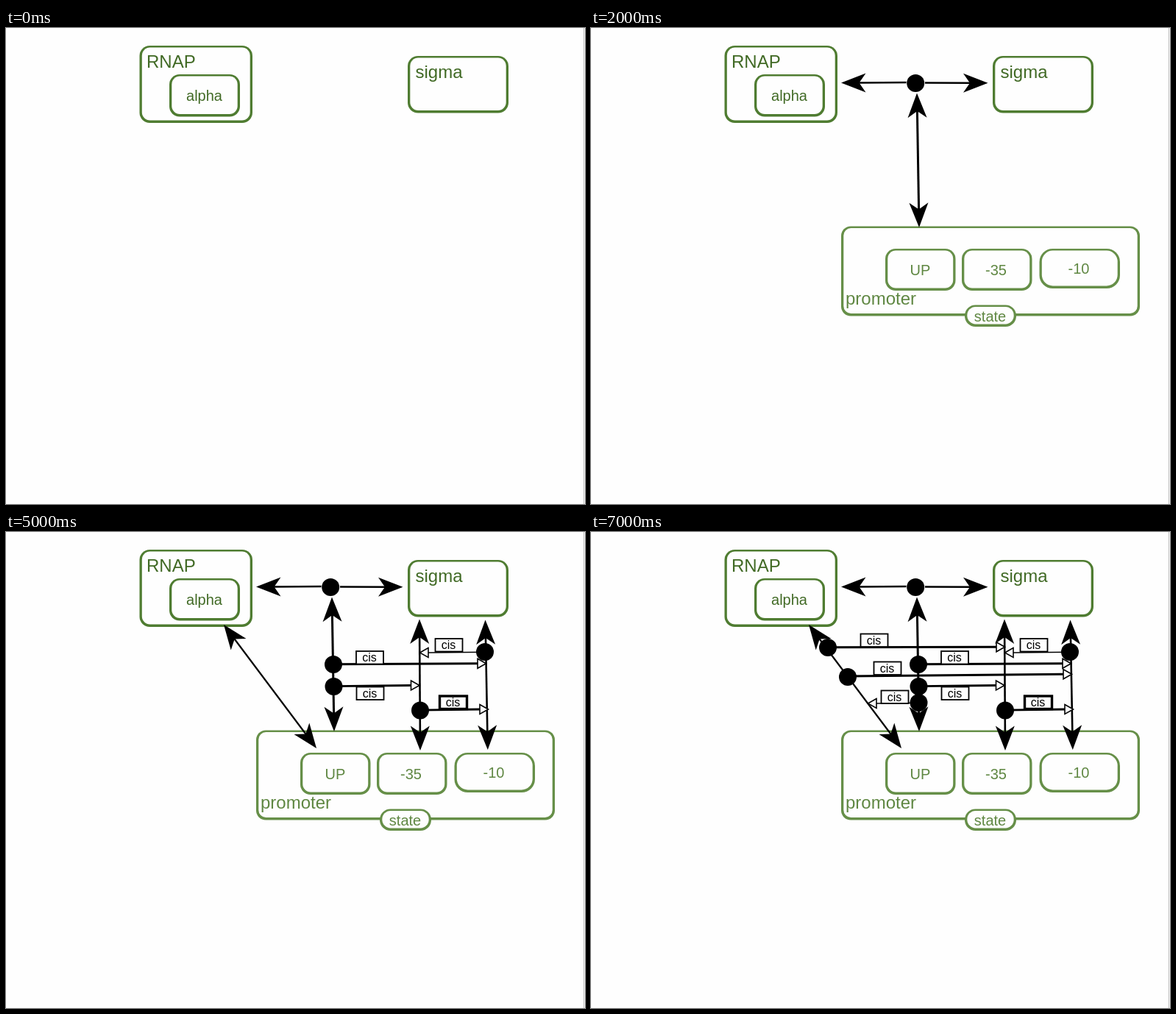
Write an HTML page with a canvas that moves like this. It is 787x647 px and loops after 8000 ms.

```html
<!DOCTYPE html>
<html lang="en">
<head>
<meta charset="utf-8">
<style>
  html, body { margin: 0; overflow: hidden; background: #fefefe; }
  canvas { display: block; }
</style>
</head>
<body>
<canvas id="stage" width="787" height="647"></canvas>
<script>
const ctx = document.getElementById('stage').getContext('2d');
const PAPER = '#fefefe', DARK = '#4f7c31', DARK_TEXT = '#416a25', LIGHT = '#668f48', LIGHT_TEXT = '#5f8742';

function text(label, x, baseline, size, color, align = 'center') {
  ctx.font = `${size}px "Liberation Sans", Arial, sans-serif`;
  ctx.textAlign = align;
  ctx.fillStyle = color;
  ctx.fillText(label, x, baseline);
}

function roundRect(left, top, right, bottom, radius, color) {
  ctx.beginPath();
  ctx.roundRect(left, top, right - left, bottom - top, radius);
  ctx.fillStyle = color;
  ctx.fill();
}

// The top edge is slightly thinner than the others.
function box(left, top, right, bottom, radius, color) {
  roundRect(left, top, right, bottom, radius, color);
  roundRect(left + 3.3, top + 2.5, right - 3.3, bottom - 3.6, radius - 3, PAPER);
}

function line(x1, y1, x2, y2, width) {
  ctx.beginPath();
  ctx.moveTo(x1, y1);
  ctx.lineTo(x2, y2);
  ctx.lineWidth = width;
  ctx.strokeStyle = '#000';
  ctx.stroke();
}

function dot(x, y) {
  ctx.beginPath();
  ctx.arc(x, y, 12, 0, Math.PI * 2);
  ctx.fillStyle = '#000';
  ctx.fill();
}

function head(x, y, angle) {
  ctx.save();
  ctx.translate(x, y);
  ctx.rotate(angle);
  ctx.beginPath();
  ctx.moveTo(0, 0);
  ctx.lineTo(-33.5, -13);
  ctx.lineTo(-24.5, 0);
  ctx.lineTo(-33.5, 13);
  ctx.fillStyle = '#000';
  ctx.fill();
  ctx.restore();
}

function doubleArrow(x1, y1, x2, y2, width) {
  const angle = Math.atan2(y2 - y1, x2 - x1);
  const dx = Math.cos(angle) * 22, dy = Math.sin(angle) * 22;
  line(x1 + dx, y1 + dy, x2 - dx, y2 - dy, width);
  head(x1, y1, angle + Math.PI);
  head(x2, y2, angle);
}

// A dot, a line to an open triangle, and a framed "cis" label centred on labelX.
function cis(x, y, tipX, tipY, labelX, labelTop, width, frame = 1.8) {
  const base = tipX - 11.5 * Math.sign(tipX - x);
  line(x, (y + tipY) / 2 + (y - tipY) / 4, base, tipY, width);
  dot(x, y);
  ctx.beginPath();
  ctx.moveTo(base, tipY - 6.5);
  ctx.lineTo(tipX, tipY);
  ctx.lineTo(base, tipY + 6.5);
  ctx.closePath();
  ctx.fillStyle = PAPER;
  ctx.fill();
  ctx.lineWidth = 1.6;
  ctx.stroke();
  ctx.lineWidth = frame;
  ctx.fillRect(labelX - 18.5, labelTop, 37, 17.5);
  ctx.strokeRect(labelX - 18.5, labelTop, 37, 17.5);
  text('cis', labelX - 0.5, labelTop + 14, 16, '#000');
}

// One entry per second; each adds to what is already there.
const steps = [
  () => {
    line(785.5, 1, 785.5, 647, 1);
    ctx.fillStyle = '#bbb';
    ctx.fillRect(785, 0, 1, 647);
    box(181.5, 24, 335, 129, 14, DARK);
    box(222, 63, 318, 120.5, 14, DARK);
    box(546, 38, 683, 115.5, 14, DARK);
    text('RNAP', 191, 54, 24, DARK_TEXT, 'left');
    text('alpha', 269.5, 99, 20, DARK_TEXT);
    text('sigma', 556.5, 68, 24, DARK_TEXT, 'left');
  },
  () => {
    line(362, 74.5, 428.5, 74, 2.6);
    line(454, 74.5, 517, 74.8, 2.6);
    head(340, 74.5, Math.PI);
    head(539.5, 74.8, 0);
    dot(441.2, 75);
  },
  () => {
    box(340, 269.5, 746, 391.5, 13, LIGHT);
    box(400, 300, 495.5, 357, 14, LIGHT);
    box(504, 300, 599.5, 357, 14, LIGHT);
    box(609.5, 300, 719, 354, 18, LIGHT);
    box(508, 376.5, 578, 406, 14.5, LIGHT);
    text('promoter', 346, 376, 24, LIGHT_TEXT, 'left');
    text('UP', 447.5, 336, 20, LIGHT_TEXT);
    text('-35', 550.5, 336, 20, LIGHT_TEXT);
    text('-10', 663, 334, 20, LIGHT_TEXT);
    text('state', 542.5, 399, 20, LIGHT_TEXT);
    doubleArrow(443, 88.5, 446, 271, 3);
  },
  () => {
    doubleArrow(296, 126, 422, 294, 2.4);
    doubleArrow(562, 118.5, 563, 297, 2.6);
    doubleArrow(651.5, 119.5, 654.8, 296, 2.6);
  },
  () => {
    cis(445, 180, 652.5, 178.8, 494.5, 162, 3);
    cis(445.5, 210, 562, 208.5, 495, 210.5, 3);
  },
  () => {
    cis(651, 163, 562.5, 164, 602, 145, 1.7);
    cis(563, 242.5, 655.5, 241, 608, 223, 3, 3.4);
  },
  () => cis(445.5, 232, 376.5, 233, 413, 215.5, 1.7),
  () => {
    cis(322, 157, 562.5, 156.3, 385, 138.5, 3);
    cis(349, 197, 653.5, 193.3, 403, 176.5, 3);
  },
];

function draw() {
  const count = Math.floor(performance.now() % 8000 / 1000) + 1;
  ctx.fillStyle = PAPER;
  ctx.fillRect(0, 0, 787, 647);
  steps.slice(0, count).forEach(step => step());
  requestAnimationFrame(draw);
}
draw();
</script>
</body>
</html>
```
